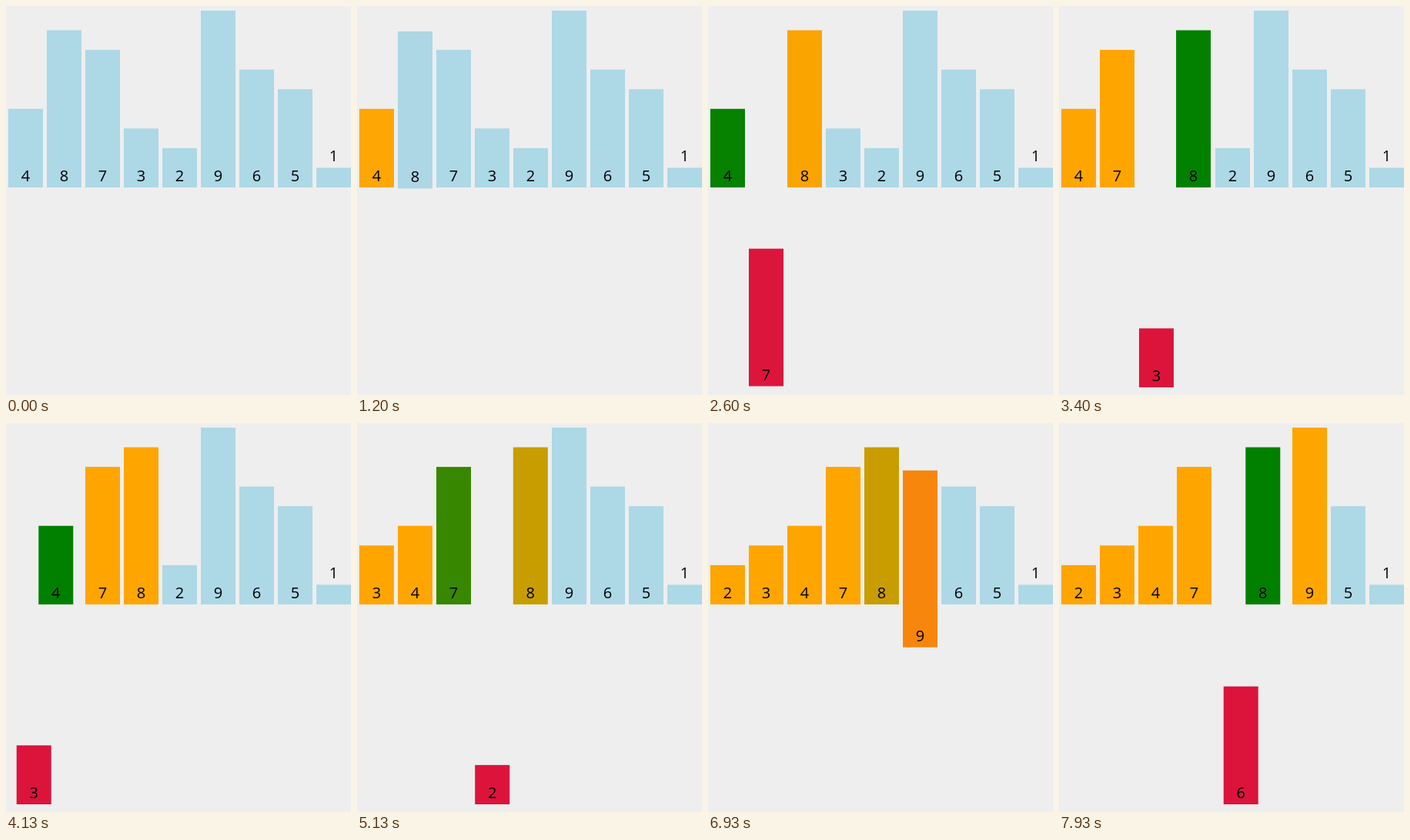
An HTML page with a canvas that plays this animation: 448x506 px, repeating every 8000 ms.

```html
<!DOCTYPE html>
<html lang="en">
<head>
<meta charset="utf-8">
<title>Insertion sort</title>
<style>
html, body { margin: 0; width: 100%; height: 100%; overflow: hidden; background: #eee; }
canvas { display: block; }
</style>
</head>
<body>
<canvas id="stage" width="448" height="506"></canvas>
<script>
const LOOP = 8000, FRAMES_PER_SECOND = 15;
const FIRST_FRAME = 12, FRAMES_PER_STEP = 3;
const BASE = 236, DROP = 260, UNIT = 230 / 9;
const BLUE = [173, 216, 230], ORANGE = [255, 165, 0];
const GREEN = [0, 128, 0], RED = [220, 20, 60];

const values = [4, 8, 7, 3, 2, 9, 6, 5, 1];
const ctx = document.getElementById('stage').getContext('2d');

const ease = t => t < 0.5 ? 4 * t ** 3 : 1 - 4 * (1 - t) ** 3;
const mix = (from, to, p) => from.map((bar, i) => bar.map((v, k) => v + (to[i][k] - v) * p));

// Progress of a step in each of its three frames, and where the next step cuts it off
const FRAME_PROGRESS = [0.112, 0.372, 0.623].map(ease);
const CUT_PROGRESS = ease(0.831);

// Run the sort and keep each bar's slot, drop and colour after every step
function sortSteps() {
  const bars = values.map((value, slot) => ({ value, slot, drop: 0, color: BLUE }));
  const order = [...bars];
  const steps = [];
  const record = () => steps.push(bars.map(b => [b.slot, b.drop, ...b.color]));
  const place = (bar, slot) => { order[slot] = bar; bar.slot = slot; };

  record();
  order[0].color = ORANGE;
  record();
  for (let k = 1; k < order.length; k++) {
    const key = order[k];
    key.drop = 1;
    key.color = RED;
    record();
    let compared;
    for (let j = k - 1; j >= 0; j--) {
      if (compared) compared.color = ORANGE;
      compared = order[j];
      compared.color = GREEN;
      record();
      if (compared.value < key.value) break;
      place(compared, j + 1);
      place(key, j);
      record();
    }
    compared.color = key.color = ORANGE;
    key.drop = 0;
    record();
  }
  return steps;
}

const targets = sortSteps();
const starts = [targets[0]];
targets.forEach((target, i) => starts.push(mix(starts[i], target, CUT_PROGRESS)));

function poseAt(time) {
  // Frame times are rounded to hundredths of a second
  const frame = Math.floor((Math.floor(time / 10) * 10 + 5) * FRAMES_PER_SECOND / 1000);
  if (frame < FIRST_FRAME) return targets[0];
  const step = Math.floor((frame - FIRST_FRAME) / FRAMES_PER_STEP);
  return mix(starts[step], targets[step], FRAME_PROGRESS[frame % FRAMES_PER_STEP]);
}

function draw(now) {
  ctx.fillStyle = '#eee';
  ctx.fillRect(0, 0, 448, 506);
  ctx.font = '20px "Open Sans", "Noto Sans", sans-serif';
  ctx.textAlign = 'center';
  poseAt(now % LOOP).forEach(([slot, drop, ...color], i) => {
    const x = 3 + slot * 50;
    const bottom = BASE + drop * DROP;
    const height = values[i] * UNIT;
    ctx.fillStyle = `rgb(${color.map(Math.round)})`;
    ctx.fillRect(x, bottom - height, 45, height);
    ctx.fillStyle = '#000';
    const labelBase = values[i] === 1 ? bottom - height : bottom;
    ctx.fillText(values[i], x + 22.5, labelBase - 8);
  });
}

const origin = performance.now();
function tick() {
  draw(performance.now() - origin);
  requestAnimationFrame(tick);
}
tick();
</script>
</body>
</html>
```
